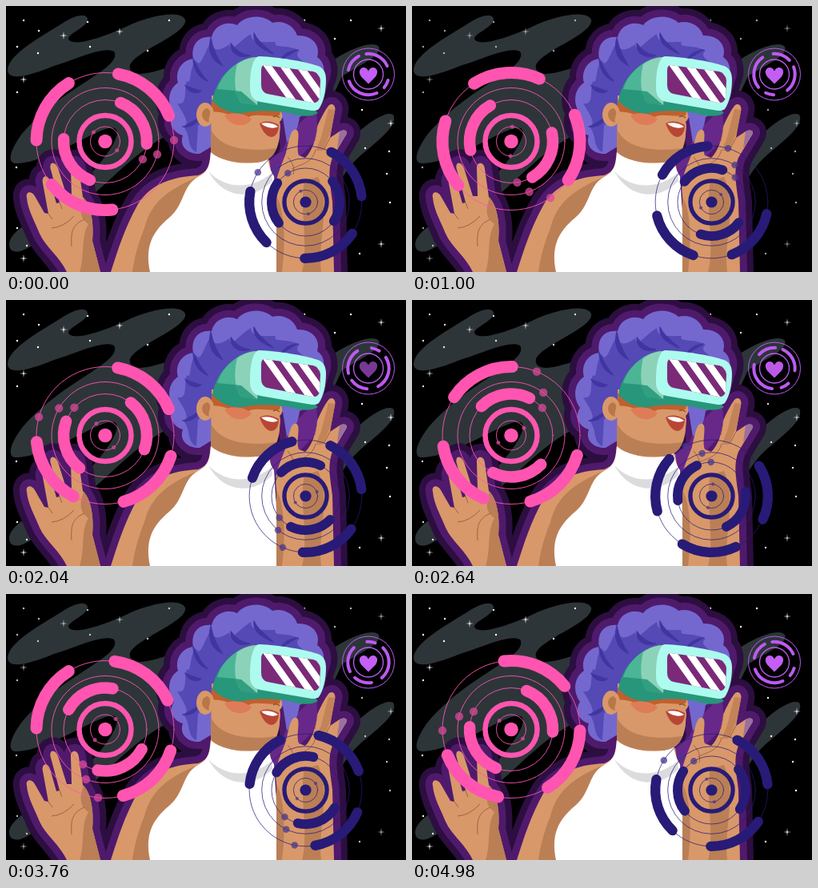
These frames come from a looping animation (500 px wide and 333 px high, 5000 ms). An HTML page:

```html
<!DOCTYPE html>
<html lang="en">
<head>
<meta charset="utf-8">
<title>Virtual reality</title>
<style>
html, body { margin: 0; width: 100%; height: 100%; overflow: hidden; background: #000; }
svg { display: block; width: 100vw; height: 100vh; }
</style>
</head>
<body>
<svg viewBox="0 0 500 333" preserveAspectRatio="none">
  <defs>
    <path id="hair" d="M242 185C228 186 216 176 221 162C208 158 203 146 210 135C201 122 202 105 215 96C211 82 219 68 234 66C231 49 240 37 257 39C260 25 275 18 289 24C298 11 322 10 333 21C346 17 360 24 364 37C381 36 394 48 389 64C398 70 400 82 394 94L385 130L367 139C365 155 359 165 351 171L346 140L300 150Z"/>
    <path id="torso" d="M256 183C254 196 255 207 240 212C205 214 180 224 165 248C148 278 139 308 131 333H350L336 240L329 192Z"/>
    <path id="palm" d="M26 240C24 232 32 231 36 238L48 259L53 260L46 222C44 212 52 210 55 219L63 247L67 246L56 205C53 195 61 193 65 203L76 238L82 238L81 204C80 195 90 194 91 204L96 239C107 250 110 274 108 294L118 333H76C68 315 49 301 42 285C37 272 27 255 26 240Z"/>
    <path id="arm" d="M338 333V236C335 216 344 201 350 184C354 167 356 153 363 155C369 158 362 176 366 187L374 190C382 183 388 166 389 151C393 141 398 132 403 125C408 120 413 125 411 132L405 165L417 157C424 153 429 157 424 163L408 190C401 209 406 225 408 245L410 333Z"/>
    <g id="figure"><use href="#hair"/><use href="#torso"/><use href="#palm"/><use href="#arm"/></g>
    <path id="screen" d="M323 74L384 82Q392 84 393 93L392 114Q391 122 383 121L327 110Q319 108 319 99V81Q319 74 323 74Z"/>
    <clipPath id="lens"><use href="#screen"/></clipPath>
    <clipPath id="armClip"><use href="#arm"/></clipPath>
  </defs>

  <rect width="500" height="333"/>
  <g fill="#2d3539">
    <path d="M2 80C3 60 45 38 70 22C85 12 100 8 102 16C103 26 78 34 78 41C82 52 120 40 150 26C178 12 218 4 224 17C228 36 150 60 155 78C158 92 190 82 215 72L232 150C180 165 150 200 110 235C80 260 40 300 18 307C8 309 4 305 4 298C5 280 40 265 70 245C100 220 145 170 138 155C130 140 60 195 14 197C0 198 5 180 20 160C50 125 85 105 110 88C130 75 140 65 135 57C122 50 90 66 60 75C30 87 3 95 2 80Z"/>
    <path d="M380 92C410 60 458 40 466 51C471 62 440 75 420 88L405 120Z"/>
    <path d="M405 192C430 165 470 128 484 136C492 150 460 172 440 190C425 204 415 225 400 245Z"/>
  </g>
  <g id="stars" fill="#fff"></g>

  <g stroke-linejoin="round">
    <use href="#figure" fill="#2d0e40" stroke="#2d0e40" stroke-width="34"/>
    <use href="#figure" fill="#4f1a6c" stroke="#4f1a6c" stroke-width="18"/>
  </g>
  <path d="M347 178C358 150 380 136 388 128L390 166L366 190L335 225L329 194Z" fill="#67288a"/>

  <use href="#hair" fill="#7468cf"/>
  <path d="M238 183C225 176 232 164 222 151C232 149 220 132 214 122C228 125 222 105 226 94C232 100 229 78 237 68C243 79 246 63 256 45C258 57 267 57 279 48C281 61 291 44 306 35C306 47 322 45 337 45C333 54 351 47 367 56C357 63 374 71 385 78L300 80L264 110L257 132L240 150Z" fill="#5449b5"/>
  <path d="M234 66C235 84 245 91 252 94C243 86 239 76 234 66M256 40C251 60 261 70 270 74C262 62 258 52 256 40M281 47C281 60 292 66 305 62C293 61 286 55 281 47M310 34C309 49 322 54 334 60C324 50 315 46 310 34M365 55C353 56 346 62 342 69M224 99C229 110 240 110 244 106M221 151C232 153 239 146 242 139" fill="#4135a1" stroke="#4135a1" stroke-width="1.5" stroke-linecap="round"/>

  <use href="#torso" fill="#d9986a"/>
  <path d="M240 214C202 230 181 246 173 278C164 300 160 318 158 333H205L240 245Z" fill="#bb7f56"/>
  <path d="M256 182C276 199 306 200 327 191C329 201 331 207 335 213L337 245L341 333H180C174 303 181 284 204 265C224 248 220 225 240 214C254 207 255 197 256 182Z" fill="#fff"/>
  <path d="M253 207C273 229 307 231 332 209L333 219C309 244 272 242 253 207Z" fill="#dcdcde"/>

  <path d="M257 112L256 182C276 200 320 200 331 189C338 183 341 172 342 163C342 157 344 151 342 145C346 142 346 137 344 133V115Z" fill="#d9986a"/>
  <path d="M256 154C267 179 304 183 338 178C333 193 319 197 305 196C284 196 267 193 256 183Z" fill="#bb7f56"/>
  <path d="M257 117C284 132 312 128 344 128L342 137C327 140 309 132 299 142C284 142 274 130 257 133Z" fill="#bf602e"/>
  <path d="M273 137C285 131 302 136 307 142C301 151 283 154 273 137Z" fill="#df7c58"/>
  <ellipse cx="249" cy="136" rx="11" ry="15" fill="#d9986a"/>
  <path d="M254 146C242 143 243 129 252 128C259 133 252 139 254 146Z" fill="#b77749"/>
  <path d="M317 147C325 142 334 145 341 149C341 158 337 164 331 164C325 163 320 156 317 147Z" fill="#b84635"/>
  <path d="M319 147C326 145 335 147 340 151C335 154 325 153 319 147Z" fill="#fff"/>
  <path d="M334 139Q338 136 342 140" fill="none" stroke="#87522f" stroke-width="1.3"/>

  <path d="M258 119C260 103 270 85 285 75C293 67 305 64 319 64L390 134C380 140 366 138 354 134C327 130 310 131 297 134C280 136 267 128 258 119Z" fill="#27967a"/>
  <path d="M264 104C268 90 280 76 294 69L320 64L314 110L285 106Z" fill="#4bb596"/>
  <path d="M289 73C298 66 309 63 321 64L314 124L294 121C286 112 284 92 289 73Z" fill="#8cd2b9"/>
  <path d="M285 106L294 107L314 124L294 122Z" fill="#319f80"/>
  <path d="M317 63C341 64 372 69 390 75C398 78 400 85 400 92C400 107 397 120 391 129C387 132 382 131 376 130L318 120C308 118 305 111 305 103C305 88 306 75 311 67Q313 63 317 63Z" fill="#adfbee"/>
  <use href="#screen" fill="#7b2a78"/>
  <path d="M325 72L362 124M345 72L382 124M365 72L402 124M385 72L422 124" clip-path="url(#lens)" stroke="#fff" stroke-width="8.5"/>

  <use href="#palm" fill="#d9986a"/>
  <path d="M97 240C107 250 110 274 108 294L118 333H92C99 311 93 290 103 273C89 263 94 250 97 240Z" fill="#bb7f56"/>
  <path d="M57 278Q72 277 85 263M82 301C81 284 82 274 98 267M53 260L58 267M67 246L70 254" fill="none" stroke="#9a6442" stroke-width="1"/>
  <use href="#arm" fill="#d9986a"/>
  <g clip-path="url(#armClip)">
    <path d="M373 219C366 251 379 300 370 333H394C389 295 407 250 390 214ZM338 238C348 254 350 295 345 333H335Z" fill="#bb7f56"/>
    <path d="M403 129L394 164L387 181L396 181L406 158L412 130Z" fill="#c38358"/>
    <path d="M387 180C382 197 371 197 357 204M352 189C359 197 361 203 359 211M405 165L397 180M389 151L386 169" fill="none" stroke="#9a6442" stroke-width="1"/>
  </g>
  <path d="M417 157C424 153 429 157 424 163L414 178Z" fill="#9a70a0"/>

  <g id="dials"></g>
  <g transform="translate(453 85.5)" fill="none" stroke="#bd5af2">
    <circle r="32.5" stroke-width="1"/>
    <circle r="18.5" stroke-width="1.3"/>
    <g id="badge" stroke-width="4" stroke-linecap="round"></g>
    <path id="heart" d="M0 12L-9 3C-16-7-4-13 0-4C4-13 16-7 9 3Z" fill="#c45ef5" stroke="none"/>
  </g>
</svg>
<script>
const LOOP = 5000;
const byId = id => document.getElementById(id);

const polar = (r, deg) => {
  const a = deg * Math.PI / 180;
  return [r * Math.cos(a), r * Math.sin(a)].map(n => n.toFixed(2));
};
const arc = (r, from, to) =>
  `<path d="M${polar(r, from).join(' ')}A${r} ${r} 0 0 1 ${polar(r, to).join(' ')}"/>`;
const dot = (r, deg, size) => {
  const [x, y] = polar(r, deg);
  return `<circle cx="${x}" cy="${y}" r="${size}"/>`;
};
const rings = (width, ...radii) =>
  radii.map(r => `<circle r="${r}" stroke-width="${width}"/>`).join('');

// Angles are in degrees, clockwise from three o'clock.
const dials = [
  { x: 124, y: 169.5, scale: 1, color: '#ff55b0', dots: '#d94a9b', turn: 540,
    outer: 84, inner: 111.5, trail: -1, pair: [218, 37] },
  { x: 374.5, y: 245.5, scale: .818, color: '#271b77', dots: '#4a3590', turn: 720,
    outer: 297, inner: 142, trail: 212, pair: [246, 77] }
];

byId('dials').innerHTML = dials.map(d => `
  <g transform="translate(${d.x} ${d.y}) scale(${d.scale})">
    <g fill="none" stroke="${d.color}" stroke-linecap="round">
      ${rings(.9, 18.5, 52, 67, 86)}${rings(6.5, 32.5)}
      <circle r="8.7" fill="${d.color}" stroke="none"/>
      <g class="spin">
        <g stroke-width="15">${[0, 97, 197].map(a => arc(86, d.outer + a, d.outer + a + 57)).join('')}</g>
        <g stroke-width="14.5">${[0, 180].map(a => arc(52, d.inner + a, d.inner + a + 72)).join('')}</g>
        <g fill="${d.dots}" fill-opacity=".75" stroke="none">
          ${dot(86, d.trail, 5.2)}${dot(67, d.trail + 15, 5.2)}${dot(52, d.trail + 26.5, 5.2)}
          ${d.pair.map(a => dot(18.5, a, 2.5)).join('')}
        </g>
      </g>
    </g>
  </g>`).join('');
const spins = [...document.querySelectorAll('.spin')];

byId('badge').innerHTML =
  [[17, 40], [66, 160], [192, 242], [264, 336]].map(([a, b]) => arc(25.7, a, b)).join('');

const specks = [[22, 18], [41, 31], [14, 51], [40, 59], [14, 108], [102, 20], [105, 51],
  [204, 18], [177, 56], [373, 18], [431, 18], [411, 41], [445, 130], [449, 178], [479, 182],
  [476, 210], [480, 246], [442, 310], [13, 202], [14, 278], [26, 300]];
const sparkles = [[72, 37], [142, 32], [22, 92], [469, 28], [481, 147], [469, 298], [22, 316]];
byId('stars').innerHTML =
  specks.map(([x, y]) => `<circle cx="${x}" cy="${y}" r="1.2"/>`).join('') +
  sparkles.map(([x, y]) =>
    `<path d="M${x} ${y - 5}l.6 4.4 4.4 .6-4.4 .6-.6 4.4-.6-4.4-4.4-.6 4.4-.6z"/>`).join('');

function draw(t) {
  const p = t / LOOP;
  const eased = p * p * (3 - 2 * p);
  spins.forEach((el, i) => el.setAttribute('transform', `rotate(${eased * dials[i].turn})`));
  byId('badge').setAttribute('transform', `rotate(${eased * 720})`);
  byId('heart').setAttribute('opacity', 1 - .4 * Math.exp(-(((t - 1980) / 450) ** 2)));
  const twinkle = t < 540 ? 1 : .78 + .22 * Math.cos((t - 540) / 750 * 2 * Math.PI);
  byId('stars').setAttribute('opacity', twinkle);
}

const start = performance.now();
function tick() {
  draw((performance.now() - start) % LOOP);
  requestAnimationFrame(tick);
}
tick();
</script>
</body>
</html>
```
